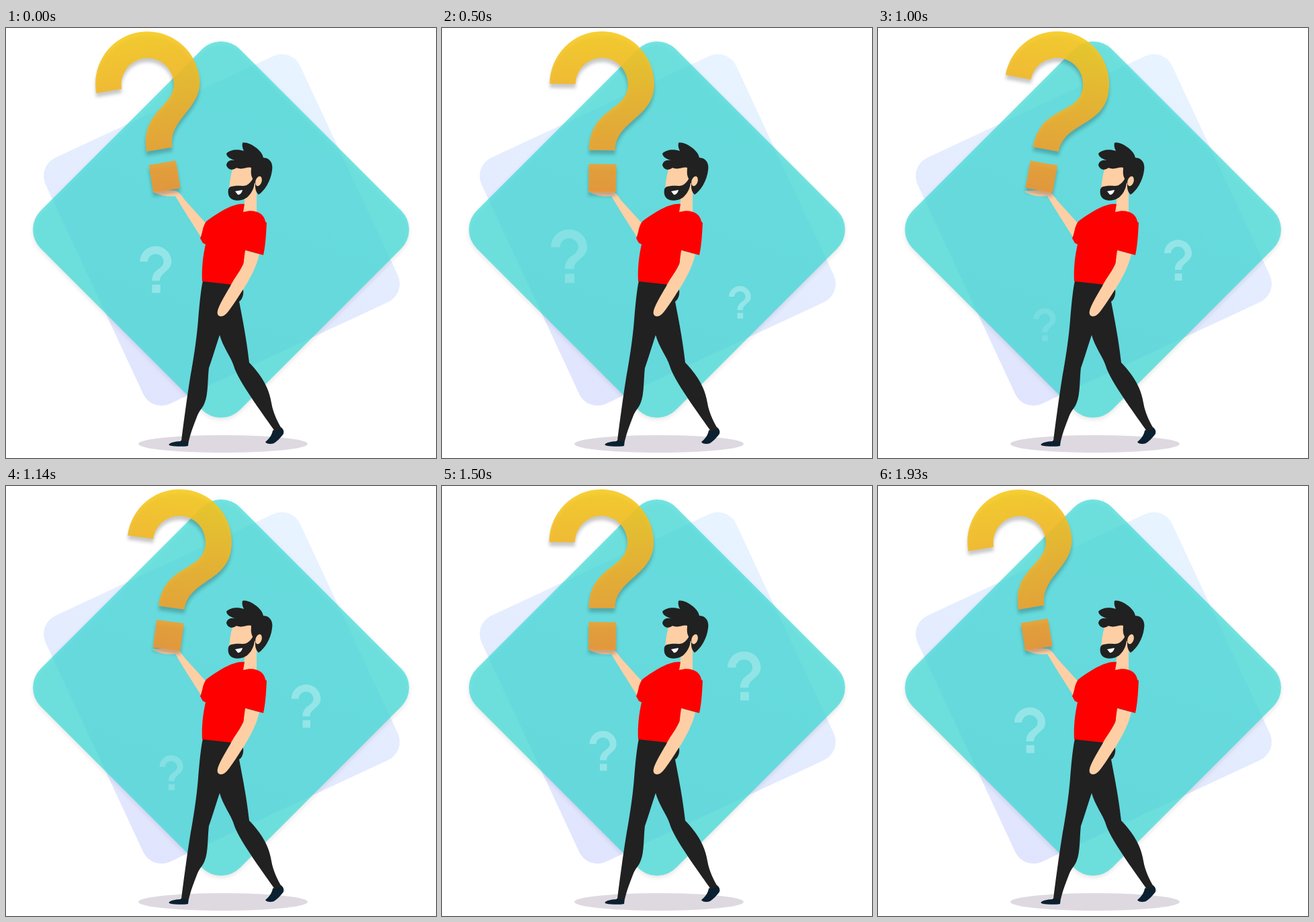
Animation of 640x640 px, one loop 2000 ms. Source, as an HTML page:

```html
<!DOCTYPE html>
<html lang="en">
<head>
<meta charset="utf-8">
<title>Man carrying a question mark</title>
<style>
html, body { margin: 0; width: 100%; height: 100%; overflow: hidden; background: #fff; }
svg { display: block; width: 100%; height: 100%; }
.skin { fill: #fecfa5; }
.dark { fill: #212121; }
.shoe { fill: #0b2030; }
#panel { fill: #3ddbd9; fill-opacity: .72; filter: drop-shadow(0 3px 3px rgba(0,0,0,.14)); }
#big { fill: url(#gold); fill-opacity: .9; }
#lift { filter: drop-shadow(0 6px 2.5px rgba(0,0,0,.24)); }
</style>
</head>
<body>
<svg viewBox="0 0 640 640">
  <defs>
    <linearGradient id="pale" x1="1" y1="0" x2="0" y2="1">
      <stop offset="0" stop-color="#e8f4ff"/>
      <stop offset="1" stop-color="#e0e4fe"/>
    </linearGradient>
    <linearGradient id="gold" x1="0" y1="0" x2="0" y2="1">
      <stop offset="0" stop-color="#f5ca1e"/>
      <stop offset="1" stop-color="#f09530"/>
    </linearGradient>
    <path id="mark" d="M236 5C193 5 158.500 40 158.500 84H197C197 62.500 214.500 44.500 236 44.500S275 62 275 84C275 123.500 218 118.500 218 182H257C257 138 314 133 314 84C314 40 279 5 236 5ZM218 202.500H259V244H218Z"/>
  </defs>

  <rect x="112" y="98.500" width="418" height="404" rx="30" fill="url(#pale)" transform="rotate(-25 321 300.500)"/>
  <g id="panel"><rect x="110.300" y="90.300" width="419.400" height="419.400" rx="40" transform="rotate(45 320 300)"/></g>
  <ellipse cx="323" cy="619" rx="126" ry="13" fill="#ded9e0"/>

  <use id="left" href="#mark" fill="#fff"/>
  <use id="right" href="#mark" fill="#fff"/>

  <!-- Raised arm, legs and shoes -->
  <path class="skin" d="M218 243C226 242 250 240 256 244C260 247 264 253 267 257L297 290L290 311C280 295 268 277 252 250C240 252 226 249 218 243Z"/>
  <path class="shoe" d="M260 614L272 614L271 622C262 623.500 248 623 243 621C240 618 253 615 260 615Z"/>
  <path class="shoe" d="M397 599L409 594C413 597 414 600 413 604C408 611 402 616 399 618C394 620 387 619 386 616C391 612 396 606 397 599Z"/>
  <path class="dark" d="M293 376L337 380L353 390C354 396 352 404 347 407C351 428 358 462 362 498C385 522 392 540 395 558C398 575 405 587 410 596L400 600C385 578 345 525 339 503C335 490 323 475 318 457C312 475 306 495 302 506C300 522 301 545 296 557C293 566 288 568 284 579C279 592 275 602 272 615L261 615C264 590 270 545 275 515C280 488 284 460 286 435C288 410 290 390 293 376Z"/>

  <!-- Head -->
  <path class="skin" d="M339 206C334 216 333 232 332 240L345 252L356 249L353 275H373V246L382 215L362 204Z"/>
  <path class="dark" d="M352 171C360 168 381 181 383 193C393 193 398 202 396 212C394 228 385 242 376 248C371 243 371 239 371 232L366 222C364 216 365 212 365 208C358 206 352 212 343 208C337 213 330 211 328 204C329 197 336 196 341 197C335 195 329 193 328 187C333 181 345 180 354 183C352 179 351 175 352 171Z"/>
  <ellipse class="skin" cx="376" cy="228" rx="4.500" ry="7.500" transform="rotate(18 376 228)"/>
  <path class="dark" d="M331 240C333 235 337 236 341 235C347 234 352 236 358 234C365 230 368 224 369 219C372 232 368 243 361 250C354 258 340 258 335 254C331 251 330 246 331 240Z"/>
  <path fill="#fff" d="M341 243L352 241C351 246 347 249 345 248Z"/>

  <!-- Shirt and lowered arm -->
  <path fill="#f00" d="M355 262C340 260 318 273 298 288C292 296 293 305 289 313L293 320L297 322C293 340 291 358 292 377L337 382L354 350L357 331L383 338C386 325 387 310 388 290L386 288C384 276 371 269 353 274Z"/>
  <path class="skin" d="M356 331L377 337C374 350 368 365 355 386C345 401 333 421 327 426C320 432 313 429 315 421C318 410 330 391 334 384C342 368 355 355 354 346Z"/>

  <g id="lift"><use id="big" href="#mark"/></g>
</svg>
<script>
const LOOP = 2000, FRAMES = 28, STEP = LOOP / FRAMES;
const MARK_HEIGHT = 239;
const byId = id => document.getElementById(id);
const smooth = s => s * s * (3 - 2 * s);

// Small marks rise and grow; u runs from 0 to 1 over each life.
const floaters = [
  {
    node: byId("left"), start: 1000, life: 1710,
    x: u => 248 - 24 * u - 56 * u ** 3,
    y: u => 337 + 104.5 * (1 - u) ** 1.75,
    height: u => 49 + 35 * u
  },
  {
    node: byId("right"), start: 140, life: 1720,
    x: u => 446.5 + 128 * (u - .5) ** 3,
    y: u => 453.5 - 216 * u,
    height: u => 39.5 + 42.5 * u
  }
];

function drawFloater({ node, start, life, x, y, height }, time) {
  const slack = STEP / 4;
  const age = (time - start + slack + LOOP) % LOOP - slack;
  const visible = age <= life + slack;
  node.style.display = visible ? "" : "none";
  if (!visible) return;
  const u = Math.min(1, Math.max(0, age / life));
  const k = height(u) / MARK_HEIGHT;
  node.setAttribute("transform",
    `translate(${x(u)} ${y(u)}) scale(${k * 1.04} ${k}) translate(-236 -124.5)`);
  node.setAttribute("opacity", .3 * Math.min(1, .4 + 3 * u, .4 + 2.4 * (1 - u)));
}

// The big mark eases through upright on each swing.
function drawBig(frame) {
  const phase = (frame + .5) / FRAMES * 4;
  const quarter = Math.floor(phase), e = smooth(phase - quarter);
  const swing = [e - 1, e, 1 - e, -e][quarter];
  const bend = swing * swing;
  byId("big").setAttribute("transform",
    `translate(${bend} ${-2.4 * bend}) rotate(${10.1 * swing + .5} 238.5 244)`);
}

function render(now) {
  const frame = Math.floor((now % LOOP + 5) / STEP) % FRAMES;
  drawBig(frame);
  floaters.forEach(f => drawFloater(f, frame * STEP));
}

const began = performance.now();
function tick() {
  render(performance.now() - began);
  requestAnimationFrame(tick);
}
tick();
</script>
</body>
</html>
```
